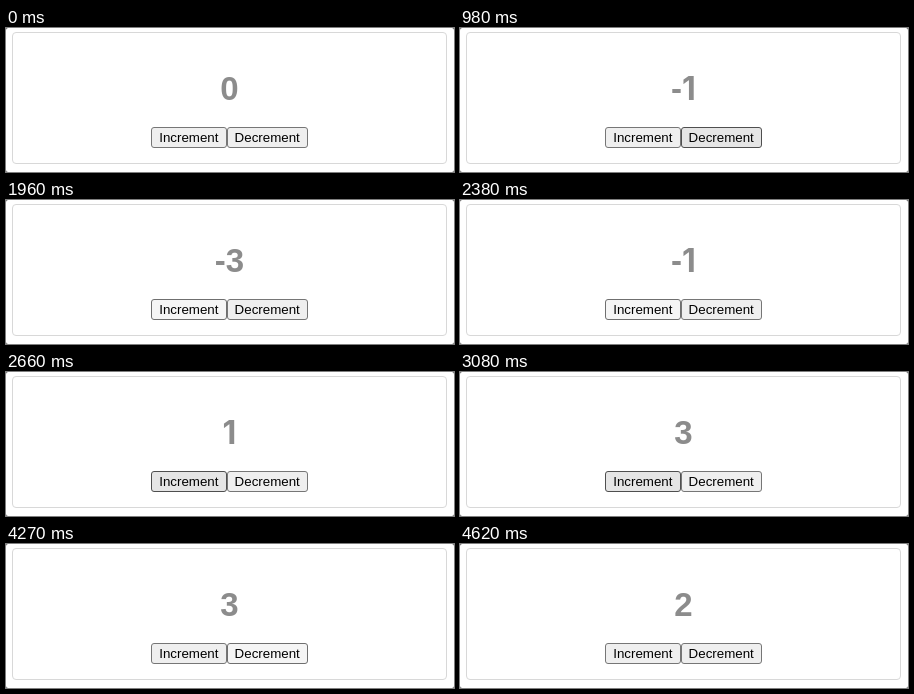
Animation of 448x144 px, one loop 4760 ms. Source, as an HTML page:

```html
<!DOCTYPE html>
<html lang="en">
<head>
<meta charset="utf-8">
<title>Counter</title>
<style>
  html, body { margin: 0; width: 100%; height: 100%; overflow: hidden; background: #fff; }
  svg { display: block; width: 448px; height: 144px; }
  text { font-family: "Liberation Sans", Arial, sans-serif; }
  #value { font-size: 33px; font-weight: 700; fill: #8c8c8c; text-anchor: middle; }
  .one { font-family: Inter, sans-serif; font-size: 32px; }
  .button text { font-size: 13.333px; fill: #000; }
  .button rect { fill: #efefef; stroke: #767676; }
  .button.hover rect { fill: #e5e5e5; stroke: #4f4f4f; }
  .button.press rect { fill: #f5f5f5; stroke: #6f6f6f; }
</style>
</head>
<body>
<svg viewBox="0 0 448 144">
  <rect width="448" height="144" fill="#666"/>
  <rect width="448" height="144" rx="2.5" fill="#fff"/>
  <rect x="6.5" y="4.5" width="434" height="131" rx="3.5" fill="none" stroke="#d8d8d8"/>
  <text id="value" x="223.5" y="72">0</text>
  <g class="button" id="increment">
    <rect x="145.5" y="99.5" width="75" height="20" rx="2.5"/>
    <text x="153.2" y="114">Increment</text>
  </g>
  <g class="button" id="decrement">
    <rect x="221.5" y="99.5" width="80" height="20" rx="2.5"/>
    <text x="228.6" y="114">Decrement</text>
  </g>
</svg>
<script>
const LOOP = 4760;
const byId = id => document.getElementById(id);
const valueText = byId('value');

// Pointer visits: button, enter and leave times.
const visits = [
  ['decrement', 980, 1680],
  ['increment', 1680, 3710],
  ['decrement', 3920, 4620]
];

// Clicks take effect on release.
const click = (step, press, release) => ({ step, press, release });
const clicks = [
  click(-1, 980, 980),
  click(-1, 1050, 1120),
  click(-1, 1260, 1330),
  ...Array.from({ length: 6 }, (_, i) => click(1, 1890 + i * 210, 2030 + i * 210)),
  click(1, 3290, 3430),
  click(-1, 4060, 4200),
  click(-1, 4270, 4410)
];

const within = (t, start, end) => t >= start && t < end;

function showValue(value) {
  const label = String(value);
  if (valueText.dataset.label === label) return;
  valueText.dataset.label = label;
  valueText.innerHTML = label.replace('1', '<tspan class="one">1</tspan>');
}

function render(t) {
  showValue(clicks.reduce((sum, c) => sum + (t >= c.release ? c.step : 0), 0));
  const pressed = clicks.some(c => within(t, c.press, c.release));
  for (const id of ['increment', 'decrement']) {
    const hovered = visits.some(([name, enter, leave]) => name === id && within(t, enter, leave));
    const state = !hovered ? '' : pressed ? ' press' : ' hover';
    byId(id).setAttribute('class', 'button' + state);
  }
}

const start = performance.now();
function tick() {
  render((performance.now() - start) % LOOP);
  requestAnimationFrame(tick);
}
tick();
</script>
</body>
</html>
```
